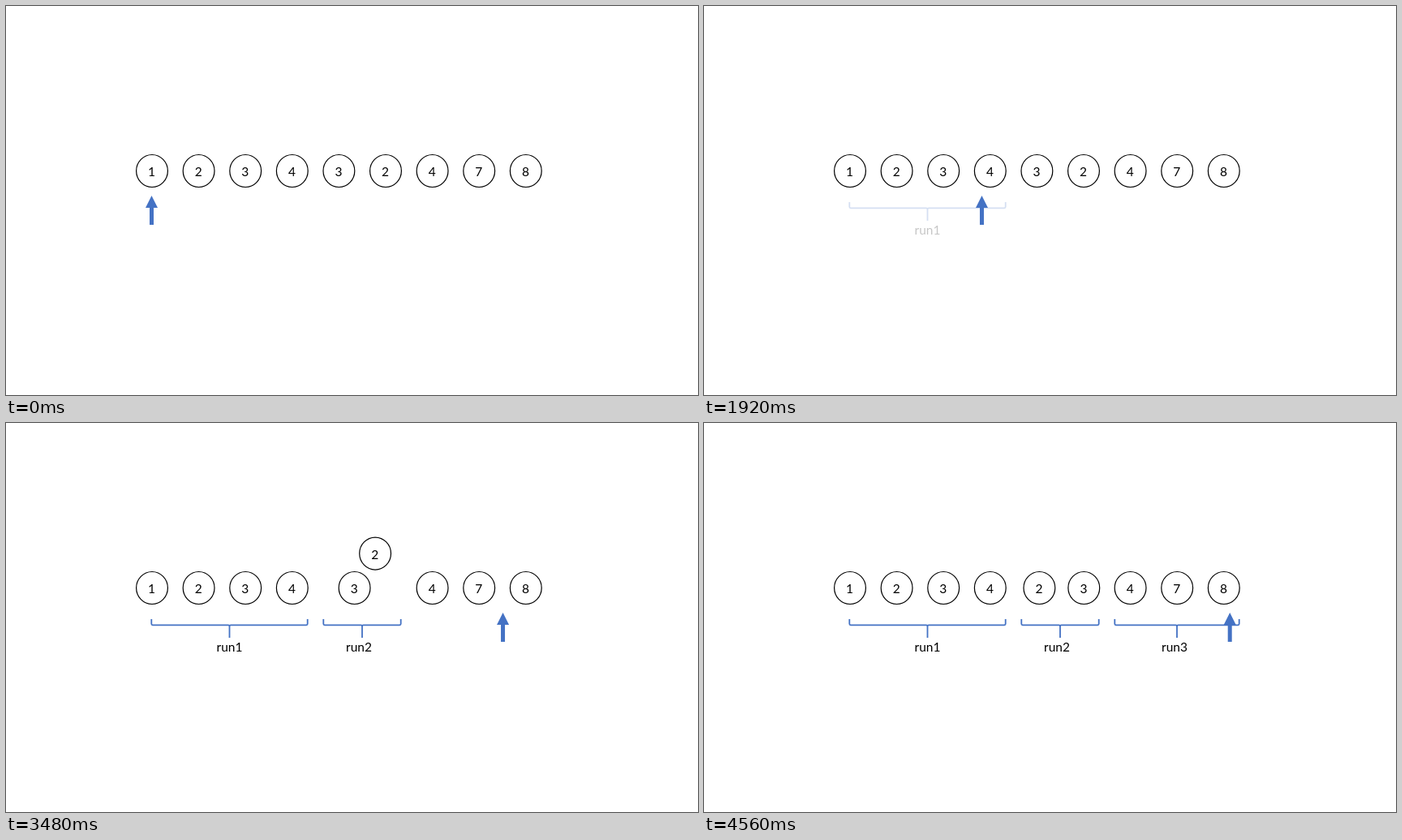
Recreate the animation shown at these times as an HTML page with a canvas. Size 853x480 px, loop 4620 ms.

```html
<!DOCTYPE html>
<html lang="en">
<head>
<meta charset="utf-8">
<title>Natural runs</title>
<style>
  html, body { margin: 0; width: 100%; height: 100%; overflow: hidden; background: #fff; }
  canvas { display: block; }
</style>
</head>
<body>
<canvas id="stage" width="853" height="480"></canvas>
<script>
const ctx = document.getElementById('stage').getContext('2d');
const LOOP = 4620, STEP = 60, TRAVEL = 4546;
const BLUE = '#4472c4', INK = '#000';
const FONT = '15.5px Lato, "Noto Sans", sans-serif';
const ROW_Y = 203.5;
const VALUES = [1, 2, 3, 4, 3, 2, 4, 7, 8];
const slotX = i => 180 + 57.6 * i;

const RUNS = [
  { label: 'run1', left: 179, right: 372, textX: 275.5, start: 0.4 },
  { label: 'run2', left: 391, right: 487, textX: 435, start: 0.6 },
  { label: 'run3', left: 506, right: 660, textX: 580, start: 0.9 }
];

// The hopping ball follows this arc at a pace measured along its length.
const hop = document.createElementNS('http://www.w3.org/2000/svg', 'path');
hop.setAttribute('d', `M${slotX(5)} ${ROW_Y} Q441 ${ROW_Y - 117} 413.4 ${ROW_Y}`);
const hopLength = hop.getTotalLength();

const clamp = v => Math.min(1, Math.max(0, v));
const lerp = (a, b, k) => a + (b - a) * k;
const ease = v => {
  const p = clamp(v);
  return p - Math.sin(2 * Math.PI * p) / (2 * Math.PI);
};

function text(value, x, y) {
  ctx.fillStyle = INK;
  ctx.font = FONT;
  ctx.textAlign = 'center';
  ctx.fillText(value, x, y);
}

function ball(value, x, y, alpha = 1) {
  if (alpha <= 0) return;
  ctx.globalAlpha = alpha;
  ctx.beginPath();
  ctx.ellipse(x, y, 19.4, 20, 0, 0, 2 * Math.PI);
  ctx.strokeStyle = INK;
  ctx.lineWidth = 1.2;
  ctx.stroke();
  text(value, x - 0.4, y + 6.8);
  ctx.globalAlpha = 1;
}

function brace({ label, left, right, textX }, alpha) {
  if (alpha <= 0) return;
  const mid = (left + right) / 2, y = 249.3, r = 1.5;
  ctx.globalAlpha = alpha;
  ctx.beginPath();
  ctx.moveTo(left + 0.3, 242);
  ctx.arcTo(left + 0.3, y, mid, y, r);
  ctx.arcTo(mid, y, mid, 265, r);
  ctx.lineTo(mid, 265);
  ctx.moveTo(right - 0.3, 242);
  ctx.arcTo(right - 0.3, y, mid, y, r);
  ctx.arcTo(mid, y, mid, 265, r);
  ctx.strokeStyle = BLUE;
  ctx.lineWidth = 1.8;
  ctx.stroke();
  text(label, textX, 282.4);
  ctx.globalAlpha = 1;
}

function arrow(x) {
  ctx.beginPath();
  ctx.moveTo(x, 234);
  ctx.lineTo(x + 7.5, 249);
  ctx.lineTo(x + 2.5, 249);
  ctx.lineTo(x + 2.5, 270);
  ctx.lineTo(x - 2.5, 270);
  ctx.lineTo(x - 2.5, 249);
  ctx.lineTo(x - 7.5, 249);
  ctx.closePath();
  ctx.fillStyle = BLUE;
  ctx.fill();
}

function draw(time) {
  const p = clamp(time / TRAVEL);
  const fade = start => clamp((p - start) / 0.1);
  const swap = ease((p - 0.6) / 0.4);
  const swapFade = fade(0.6);

  ctx.fillStyle = '#fff';
  ctx.fillRect(0, 0, 853, 480);

  VALUES.forEach((value, i) => {
    const swapped = i === 4 || i === 5;
    ball(value, slotX(i), ROW_Y, swapped ? 1 - swapFade : 1);
  });
  const spot = hop.getPointAtLength(swap * hopLength);
  ball(VALUES[4], lerp(slotX(4), 468.3, swap), ROW_Y, swapFade);
  ball(VALUES[5], spot.x, spot.y, swapFade);

  RUNS.forEach(run => brace(run, fade(run.start)));
  arrow(lerp(179.5, 648.2, ease(p)));
}

const origin = performance.now();
function tick() {
  const time = (performance.now() - origin) % LOOP;
  draw(time < 2 * STEP ? 0 : Math.floor(time / STEP) * STEP);
  requestAnimationFrame(tick);
}
tick();
</script>
</body>
</html>
```
